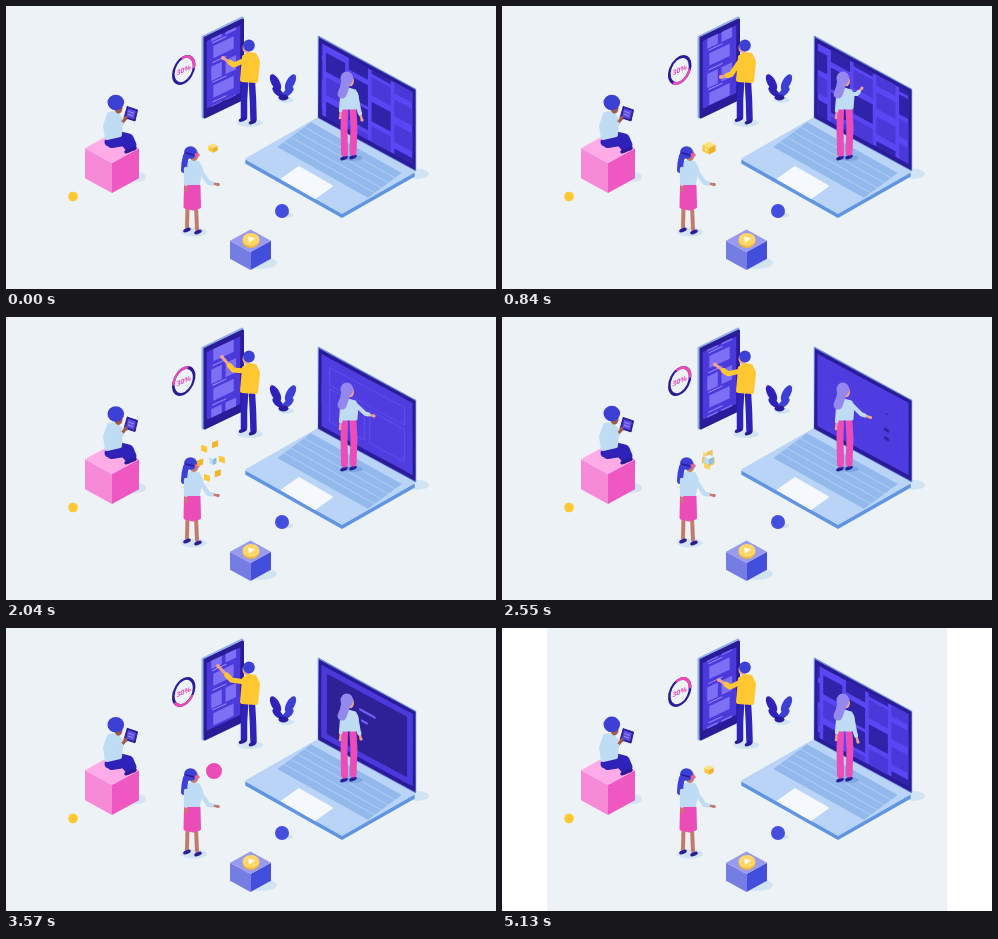
Animation of 490 by 283 pixels, one loop 5.19 s. Source, as an HTML page with a canvas:

```html
<!DOCTYPE html>
<html lang="en">
<head>
<meta charset="utf-8">
<title>Isometric workspace</title>
<style>
html, body { margin: 0; width: 100%; height: 100%; overflow: hidden; background: #ecf2f5; }
canvas { display: block; width: 100%; height: 100%; }
</style>
</head>
<body>
<canvas id="stage"></canvas>
<script>
const W = 490, H = 283, LOOP = 5190, STEP = 30, LAST = 5130;
const canvas = document.getElementById('stage');
const g = canvas.getContext('2d');
const dpr = window.devicePixelRatio || 1;
canvas.width = W * dpr;
canvas.height = H * dpr;

const BG = '#ecf2f5', NAVY = '#2a1c98', DENIM = '#2e22b8', BLUE = '#3d40d4',
  VIOLET = '#5a46f2', DEEP = '#2e2198', CARD = '#7d70f4', SKY = '#bfdcf4', SHADE = '#d2e4f1',
  PINK = '#ea4db8', YELLOW = '#ffc832', SKIN = '#eda094', TAN = '#c27c6c', BROWN = '#a15a4a',
  LILAC = '#9488ee';

// Shapes
function path(p) {
  g.beginPath();
  for (let i = 0; i < p.length; i += 2) g.lineTo(p[i], p[i + 1]);
}
function line(color, w, ...p) {
  g.strokeStyle = color;
  g.lineWidth = w;
  g.lineCap = g.lineJoin = 'round';
  path(p);
  g.stroke();
}
function poly(color, r, ...p) {
  g.fillStyle = g.strokeStyle = color;
  g.lineWidth = r;
  g.lineJoin = 'round';
  path(p);
  g.closePath();
  g.fill();
  if (r) g.stroke();
}
function oval(color, x, y, rx, ry = rx, turn = 0) {
  g.fillStyle = color;
  g.beginPath();
  g.ellipse(x, y, rx, ry, turn, 0, Math.PI * 2);
  g.fill();
}
function rect(color, x, y, w, h) {
  g.fillStyle = color;
  g.fillRect(x, y, w, h);
}
// A parallelogram from one corner and two edges
function slab(color, r, [x, y, ux, uy, vx, vy], dy = 0) {
  y += dy;
  poly(color, r, x, y, x + ux, y + uy, x + ux + vx, y + uy + vy, x + vx, y + vy);
}
// Draw on a parallelogram measured 100 x 100
function plane([x, y, ux, uy, vx, vy], draw) {
  g.save();
  g.transform(ux / 100, uy / 100, vx / 100, vy / 100, x, y);
  g.beginPath();
  g.rect(0, 0, 100, 100);
  g.clip();
  draw();
  g.restore();
}
// (x, y) is the front corner of the top face
function cube(x, y, r, h, slope, top, left, right) {
  const d = r * slope;
  slab(left, 0, [x, y, -r, -d, 0, h]);
  slab(right, 0, [x, y, r, -d, 0, h]);
  slab(top, 0, [x, y, -r, -d, r, -d]);
}
function fade(alpha, draw) {
  if (alpha <= 0) return;
  g.save();
  g.globalAlpha *= alpha;
  draw();
  g.restore();
}

// Motion
const ramp = (t, a, b) => {
  const v = Math.max(0, Math.min(1, (t - a) / (b - a)));
  return v * v * (3 - 2 * v);
};
const span = (t, a, b, d = 150) => ramp(t, a, a + d) * (1 - ramp(t, b, b + d));
const BEATS = [0, 840, 2040, 3060, 3570, 4410, LAST];
const follow = (t, values) => BEATS.reduce((v, b, i) =>
  i ? v + (values[i] - values[i - 1]) * ramp(t, BEATS[i - 1], b) : v, values[0]);
const noise = n => {
  const v = Math.sin(n * 12.9898) * 43758.5453;
  return v - Math.floor(v);
};

// Body parts
function arm(sleeve, skin, sx, sy, hx, hy, bend, w) {
  const ex = (sx + hx) / 2, ey = (sy + hy) / 2 + bend;
  line(skin, w * .6, ex, ey, hx, hy);
  line(sleeve, w, sx, sy, ex, ey, ex + (hx - ex) * .35, ey + (hy - ey) * .35);
  oval(skin, hx, hy, w * .38);
}
function shoes(x, y, gap, rise) {
  for (let i = 0; i < 2; i++) oval(NAVY, x + gap * i, y + rise * i, 4, 1.9, -.4);
}

function ring(t) {
  g.save();
  g.translate(177.7, 64);
  g.transform(1, -.45, 0, 1, 0, 0);
  const mid = -Math.PI / 4 + t / LOOP * Math.PI * 4;
  [[NAVY, Math.PI], [PINK, 1]].forEach(([color, half]) => {
    g.strokeStyle = color;
    g.lineWidth = 2.6;
    g.lineCap = 'butt';
    g.beginPath();
    g.ellipse(0, 0, 10.4, 12.7, 0, mid - half, mid + half);
    g.stroke();
  });
  g.fillStyle = PINK;
  g.font = 'bold 7px "Open Sans", Arial, sans-serif';
  g.textAlign = 'center';
  g.textBaseline = 'middle';
  g.fillText('30%', 0, .5);
  g.restore();
}

function phone(t) {
  slab('#93b0e6', 3, [197, 31, 39, -19, 0, 80]);
  slab(NAVY, 3, [199, 32, 37.5, -18, 0, 79]);
  plane([200.5, 35, 34, -16, 0, 68], () => {
    rect('#4c39dc', 0, 0, 100, 100);
    g.translate(0, 12 * Math.sin(t / LOOP * Math.PI * 4));
    for (let row = -1; row < 4; row++) {
      const y = 12 + row * 29;
      if (row % 2) for (let col = 0; col < 2; col++) rect(CARD, 14 + col * 42, y, 31, 21);
      else rect(CARD, 20, y, 60, 18);
      line('#9b92fa', 1.5, 18, y + 24, 58, y + 24);
    }
  });
}

function man(t) {
  oval(SHADE, 244, 117, 13, 4);
  line(DENIM, 6.5, 239, 77, 238, 94, 238, 111);
  line(DENIM, 6.5, 246, 77, 247, 95, 247.5, 113);
  shoes(236.5, 113.5, 10, 2.5);
  poly(YELLOW, 4, 238, 51, 243, 48, 249, 49, 252, 56, 250, 75, 236, 74);
  oval(SKIN, 240.5, 42, 4, 5);
  oval(BLUE, 243, 39.5, 5.8, 6);
  arm(YELLOW, SKIN, 239, 54, follow(t, [217, 219, 216, 210, 212, 210, 217]),
    follow(t, [52, 71, 40, 55, 38, 57, 52]), 6, 5.2);
}

function plant() {
  oval(SHADE, 280, 94, 8, 3);
  [-1, 1].forEach(side => {
    const color = side < 0 ? DENIM : BLUE;
    oval(color, 277 + side * 7.5, 76.5, 4.2, 9, side * .5);
    oval(color, 277 + side * 5, 86, 3.2, 7, side * .85);
  });
  oval(NAVY, 277.5, 91.5, 5, 3);
}

// Laptop screens
function gallery(t) {
  rect(VIOLET, 0, 0, 100, 100);
  const x = 18 * Math.sin(t / LOOP * Math.PI * 2);
  for (let col = -1; col < 5; col++)
    for (let row = -1; row < 3; row++) {
      const n = noise(col * 7 + row + 3);
      rect(n > .45 ? '#2f23aa' : '#4a38d8', 5 + col * 25 - x, 10 + row * 34 + (col & 1) * 14, 21, 22 + n * 8);
    }
}
function wires(t) {
  rect('#4f3de0', 0, 0, 100, 100);
  g.strokeStyle = '#6352f0';
  g.lineWidth = 1;
  const y = 24 * (1 - ramp(t, 1500, 2100));
  g.strokeRect(9, 12 + y, 82, 24);
  for (let col = 0; col < 2; col++) g.strokeRect(9 + col * 44, 42 + y, 38, 45);
}
function profiles(t) {
  rect('#4f3de0', 0, 0, 100, 100);
  const k = ramp(t, 2460, 2900);
  [24, 76].forEach(x => {
    oval(DEEP, x, 32, 9.5 * k, 12.5 * k);
    for (let i = 0; i < 2; i++) line(DEEP, 5, x - (7 - i * 3) * k, 54 + i * 12, x + (7 - i * 3) * k, 54 + i * 12);
  });
}
function article(t) {
  rect('#4c39dc', 0, 0, 100, 100);
  rect(DEEP, 6, 8, 88, 84);
  for (let i = 0; i < 3; i++) {
    const k = ramp(t, 3300 + i * 180, 3530 + i * 180);
    if (k) line('#6f60f6', 3.5, 43 + i * 2, 33 + i * 14, 43 + i * 2 + (15 - i * 2) * k, 33 + i * 14);
  }
}

function laptop(t) {
  const base = [312, 112, 96, 54, -72, 41];
  oval(SHADE, 411, 168, 12, 5);
  slab('#5f95e2', 2, base, 4);
  slab('#5f95e2', 2, base, 2);
  slab('#b9d4f6', 2, base);
  plane([305, 116, 91, 51, -34, 25], () => {
    rect('#93b9ec', 0, 0, 100, 100);
    for (let row = 1; row < 5; row++) line('#b3d0f5', 2, 0, row * 20, 100, row * 20);
  });
  slab('#f5f8fc', 2, [293, 161, 33, 19, -17, 12]);
  slab('#6f8fe6', 1.5, [312.5, 30.5, 97, 53, 0, 81]);
  slab(NAVY, 1, [313, 32, 96, 52, 0, 79.5]);
  plane([315.5, 37, 91, 49, 0, 72], () => {
    gallery(t);
    fade(span(t, 1440, 4550), () => wires(t));
    fade(span(t, 2430, 4550), () => profiles(t));
    fade(span(t, 3270, 4530), () => article(t));
  });
}

function laptopWoman(t) {
  oval('#7da6df', 347, 152, 10, 3);
  shoes(338, 152, 9, -1);
  line(PINK, 7, 338.5, 105, 338, 122, 338.5, 147);
  line(PINK, 7, 347, 105, 348, 122, 347, 146);
  poly(SKY, 3, 336, 86, 342, 83, 349, 85, 351, 90, 350, 102, 336, 102);
  arm(SKY, SKIN, 336, 89, 334, 112, 0, 3.6);
  arm(SKY, SKIN, 350, 88, follow(t, [356, 360, 368, 369, 355, 366, 356]),
    follow(t, [114, 82, 99, 102, 111, 89, 114]), 3, 4.2);
  oval(SKIN, 344.2, 75, 3.8, 5.3);
  oval(LILAC, 340.8, 72.5, 6.3, 7);
  line(LILAC, 9, 340, 75, 338, 83, 336, 88);
}

function sitter(t) {
  const sway = Math.sin(t / LOOP * Math.PI * 6) * .5;
  oval(SHADE, 131, 171, 9, 5);
  cube(106, 157, 27, 30, .55, '#ffabe8', '#f68ad6', '#ef58c2');
  line(DENIM, 9, 103, 136, 115, 130, 123, 132, 126, 139);
  line(DENIM, 8, 106, 138, 118, 136, 123, 142);
  shoes(122, 145, 5, -2);
  poly(SKY, 4, 103, 108, 110, 107, 115, 113, 114, 129, 101, 132, 99, 120);
  oval(BROWN, 112.5, 102 + sway, 4, 5.5);
  oval(BLUE, 109.8, 96.5 + sway, 8.3, 7.8);
  g.save();
  g.translate(0, -sway);
  const tablet = [121, 100.5, 10.5, 3.5, -2.5, 11];
  arm(SKY, BROWN, 105, 114, 120, 112, 8, 5);
  slab(NAVY, 1, tablet);
  plane(tablet, () => {
    rect('#5b4ee0', 12, 12, 76, 76);
    for (let i = 0; i < 2; i++) line('#9c94f4', 8, 25, 38 + i * 25, 70, 38 + i * 25);
  });
  oval(BROWN, 119.5, 112, 2);
  g.restore();
}

function vrWoman(t) {
  oval(SHADE, 188, 226, 13, 4.5);
  line(TAN, 4, 181.5, 200, 181, 221);
  line(TAN, 4, 190, 200, 191, 223);
  shoes(181, 224, 11, 2);
  poly(PINK, 3, 179.5, 180, 193, 180, 193.5, 201, 187, 203, 179, 201);
  poly(SKY, 4, 180, 160, 185, 156, 192, 157, 195, 163, 192, 177, 180, 177);
  oval(TAN, 188, 149, 4.5, 6);
  oval(BLUE, 184.5, 146.5, 6.5, 6.3);
  line(BLUE, 6, 180, 150, 178.5, 157, 178, 164);
  line('#e8619f', 3.5, 190, 149, 192, 149);
  line(NAVY, 1.6, 180, 147, 188, 149);
  arm(SKY, TAN, 180, 163, 180, 184, 1, 4.3);
  const lift = span(t, 4050, 4560, 320);
  arm(SKY, TAN, 193, 163, 212 - 13 * lift, 178.5 - 28.5 * lift, 6, 4.5);
}

function floater(t) {
  const gold = r => cube(0, 0, r, r, .5, '#ffe07a', '#ffc93c', '#f0b02a');
  g.save();
  g.translate(207, 142);
  fade(1 - ramp(t, 1560, 1740), () => {
    gold(4.7 + 1.8 * ramp(t, 300, 840));
    fade(ramp(t, 600, 800), () => poly('#fff4c8', 0, -4, -.5, -1, 2.3, -4, 3));
  });
  const open = ramp(t, 1620, 2040) * (1 - ramp(t, 2300, 2700));
  fade(span(t, 1590, 2500), () => {
    for (let i = 0; i < 6; i++) {
      const a = i * Math.PI / 3 + .9, tilt = i % 2 ? 2 : -2;
      const x = Math.cos(a) * 11 * open - 2 * open, y = Math.sin(a) * 17 * open + 2 * open;
      slab(i % 2 ? YELLOW : '#f0b52c', 0, [x - 3, y - 3, 6, tilt, 0, 6]);
    }
  });
  fade(span(t, 1740, 3270), () =>
    cube(0, 0, 3.5 + 2.2 * ramp(t, 2300, 2800), 6, .5, '#e6f5ff', '#b9dcf4', '#91bde2'));
  fade(span(t, 3300, 4020), () => oval(PINK, 1, 1, 8));
  fade(ramp(t, 4020, 4200), () => {
    const k = 1 - ramp(t, 4500, 4860);
    g.rotate(.25 * k);
    gold(4.7 + 1.7 * k);
  });
  g.restore();
}

function props() {
  oval(SHADE, 281, 209, 6, 2.5);
  oval('#434ede', 276, 205, 7);
  oval(YELLOW, 67, 190.5, 4.8);
  oval(SHADE, 255, 257, 16, 6);
  cube(244.5, 246, 20.5, 18, .55, '#9a9bee', '#757ce2', '#434fdc');
  for (let i = 0; i < 2; i++) oval(i ? '#ffd768' : '#efb741', 245, 235.5 - i * 2, 8.5, 6.5);
  poly('#fffbea', 0, 242, 230.5, 249, 232.5, 243, 236.5);
}

function draw(t) {
  g.setTransform(dpr, 0, 0, dpr, 0, 0);
  rect(BG, 0, 0, W, H);
  ring(t);
  phone(t);
  plant();
  man(t);
  laptop(t);
  laptopWoman(t);
  sitter(t);
  vrWoman(t);
  floater(t);
  props();
  if (t >= 4650) for (let i = 0; i < 2; i++) rect('#fff', i * 445, 0, 45, H);
}

const start = performance.now();
function tick() {
  const t = (performance.now() - start) % LOOP;
  draw(Math.min(Math.floor(t / STEP) * STEP, LAST));
  requestAnimationFrame(tick);
}
tick();
</script>
</body>
</html>
```
